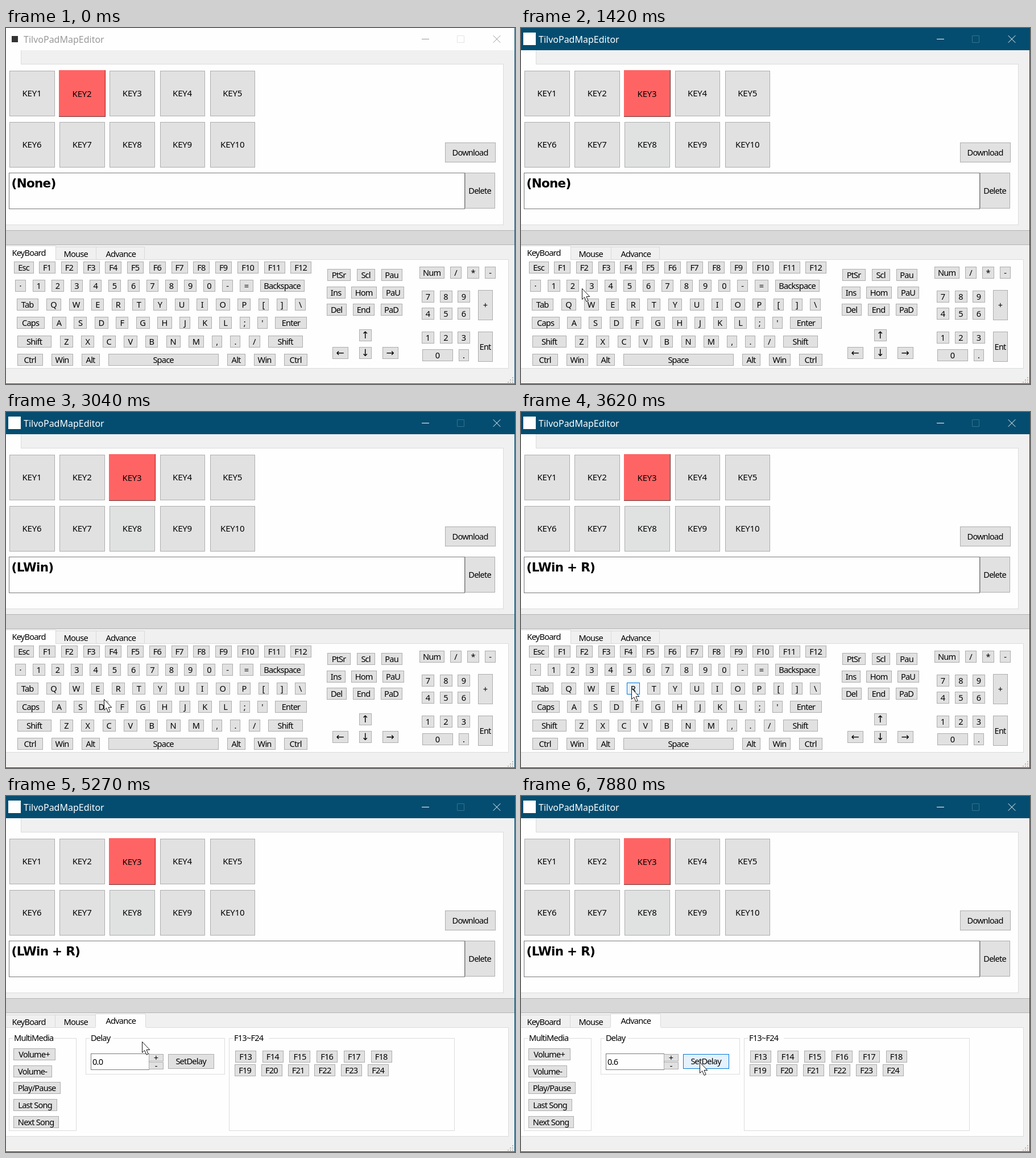
Recreate the animation shown at these times as an HTML page. Size 895 by 625 pixels, loop 7.99 s.

```html
<!DOCTYPE html>
<html lang="en">
<head>
<meta charset="utf-8">
<title>Key setter</title>
<style>
html, body { margin: 0; width: 100%; height: 100%; overflow: hidden; background: #f0f0f0; }
svg { display: block; width: 895px; height: 625px; }
text { font: 14.6px "Noto Sans", "Open Sans", sans-serif; letter-spacing: -.8px; fill: #000; white-space: pre; }
.big { font-size: 15px; letter-spacing: -.2px; }
.title { font-size: 16px; letter-spacing: 0; }
.macro { font: bold 21.5px "DejaVu Sans", sans-serif; letter-spacing: -.7px; }
.arrow { font: 17px "DejaVu Sans", sans-serif; letter-spacing: 0; }
.mid { text-anchor: middle; }
.btn { fill: #e1e1e1; stroke: #adadad; }
.btn.tint { fill: #e0e2e2; }
.btn.hover { fill: #e5f1fb; stroke: #0078d7; }
.btn.down { fill: #cce4f7; stroke: #005499; }
.tab { fill: #f0f0f0; stroke: #d9d9d9; }
.tab.hover, .tab.down { fill: #d8eaf9; }
.pane { fill: #fefefe; stroke: #dcdcdc; }
.field { fill: #fefefe; stroke: #7a7a7a; }
</style>
</head>
<body>
<svg id="stage" viewBox="0 0 895 625"></svg>
<script>
const stage = document.getElementById('stage');
const buttons = [];

function el(tag, attrs, parent = stage, text) {
  const node = document.createElementNS('http://www.w3.org/2000/svg', tag);
  for (const k in attrs) node.setAttribute(k, attrs[k]);
  if (text !== undefined) node.textContent = text;
  return parent.appendChild(node);
}
const fillBox = (x, y, width, height, fill, parent) => el('rect', { x, y, width, height, fill }, parent);
const label = (x, y, text, cls = '', parent) => el('text', { x, y, class: cls }, parent, text);
const line = (d, stroke, parent) => el('path', { d, stroke, fill: 'none' }, parent);

// Outlined box with both sides snapped to whole pixels
function frame(x, y, w, h, cls, parent) {
  const left = Math.round(x), width = Math.round(x + w) - left - 1;
  return el('rect', { x: left + .5, y: y + .5, width, height: h - 1, class: cls }, parent);
}

function button(page, x, y, w, h, text, cls = '') {
  const b = { page, x, y, w, h, base: 'btn', rect: frame(x, y, w, h, 'btn', page) };
  if (/[←-↓]/.test(text)) cls = 'arrow';
  label(x + w / 2 - .4, y + h / 2 + 5, text, 'mid ' + cls, page);
  buttons.push(b);
  return b;
}

// "name:width" items laid out left to right
function row(page, y, x, gap, spec, h = 21) {
  for (const item of spec.split(' ')) {
    const cut = item.lastIndexOf(':'), w = +item.slice(cut + 1);
    button(page, x, y, w, h, item.slice(0, cut).replace('_', ' '));
    x += w + gap;
  }
}

function tabs(page, edges, chosen) {
  frame(-2, 406, 886, 192, 'pane', page);
  ['KeyBoard', 'Mouse', 'Advance'].forEach((name, i) => {
    const x = edges[i], w = edges[i + 1] - x + 1, on = i === chosen;
    if (on) {
      fillBox(x, 382, w, 26, '#fefefe', page);
      line(`M${x + .5} 406V382.5H${x + w - .5}V406`, '#d9d9d9', page);
    } else {
      buttons.push({ page, x, y: 384, w, h: 23, base: 'tab', rect: frame(x, 384, w, 23, 'tab', page) });
    }
    label([10.5, 101.5, 175.5][i], on ? 400 : 402, name, '', page);
  });
}

function group(page, x, w, h, name, gap) {
  frame(x, 425, w, h, 'pane', page);
  fillBox(x + 7, 424, gap, 3, '#fefefe', page);
  label(x + 9, 430, name, '', page);
}

// Window
const bar = fillBox(0, 0, 895, 39, '#fefefe');
const icon = el('rect', {});
const title = label(31, 26, 'TilvoPadMapEditor', 'title');
const minMark = line('M731 19.5H744', '#999');
const maxMark = line('M793.5 13.5H805.5V25.5H793.5Z', '#e4e4e4');
const closeMark = line('M856.7 13.2L869.3 25.8M869.3 13.2L856.7 25.8', '#999');

// Upper pane
frame(-2, 63, 877, 283, 'pane');
fillBox(0, 39, 26, 27, '#fefefe');
line('M26.5 39V63', '#dcdcdc');
const pads = [];
for (let i = 0; i < 10; i++)
  pads.push(button(stage, 6 + 88.2 * (i % 5), i < 5 ? 75 : 165, 79.6, 80, 'KEY' + (i + 1), 'big'));
const [pad2, pad3, pad8] = [pads[1], pads[2], pads[7]];
const redPad = el('g', {});
fillBox(0, 0, 82, 82, '#6b2e2e', redPad);
fillBox(0, 0, 81, 81, '#ff6464', redPad);
const redText = label(40.5, 47, '', 'mid big', redPad);
button(stage, 772, 201, 89, 35, 'Download');
frame(5, 254, 802, 64, 'field');
button(stage, 807, 254, 53, 63, 'Delete');
const macro = label(9.5, 280, '', 'macro');

fillBox(0, 355, 895, 26, '#d8d8d8');
line('M0 355.5H895M0 380.5H895', '#b4b4b4');

// Keyboard page
const keys = el('g', {});
tabs(keys, [-1, 87, 158, 243], 0);
button(keys, 14, 410, 35, 21, 'Esc');
for (let i = 1; i < 10; i++) button(keys, 58 + 38.75 * (i - 1), 410, 29, 21, 'F' + i);
row(keys, 410, 407, 9.5, 'F10:37 F11:37 F12:37');
button(keys, 16, 442, 19, 21, '·');
for (let i = 0; i < 10; i++) button(keys, 47 + 33.3 * i, 442, 21.5, 21, (i + 1) % 10);
row(keys, 442, 380, 12, '-:19 =:24 Backspace:78');
button(keys, 19, 475, 38, 21, 'Tab');
row(keys, 475, 71, 13.6, 'Q:26 W:26 E:22 R:23 T:23 Y:24 U:25 I:20 O:25 P:23 [:18 ]:19 \\:19');
button(keys, 19, 507, 49, 21, 'Caps');
row(keys, 507, 81, 13.4, "A:25 S:23 D:24 F:22 G:24 H:26 J:19 K:24 L:22 ;:18 ':18 Enter:56");
button(keys, 20, 540, 60, 21, 'Shift');
row(keys, 540, 95, 14.3, 'Z:23 X:23 C:23 V:24 B:22 N:25 M:27 ,:18 .:18 /:20 Shift:61');
row(keys, 572, 20, 15, 'Ctrl:45 Win:38 Alt:32 Space:194 Alt:32 Win:38 Ctrl:41');
row(keys, 423, 565, 11, 'PtSr:41 Scl:32 Pau:37');
row(keys, 454, 564, 10, 'Ins:33 Hom:45 PaU:38');
row(keys, 484, 564, 11, 'Del:35 End:38 PaD:38');
button(keys, 621, 529, 22, 21, '↑');
row(keys, 560, 574, 19, '←:28 ↓:22 →:28');
row(keys, 419, 727, 10, 'Num:44 /:20 *:21 -:19');
['789', '456', '123'].forEach((set, i) => row(keys, [461, 491, 533][i], 731, 9.5, [...set].map(c => c + ':22').join(' ')));
row(keys, 564, 732, 10, '0:54 .:18');
button(keys, 830, 460, 26, 53, '+');
button(keys, 830, 533, 26, 53, 'Ent');

// Advance page
const extra = el('g', {});
tabs(extra, [-1, 86, 157, 245], 2);
group(extra, 5, 119, 163, 'MultiMedia', 72);
group(extra, 140, 245, 64, 'Delay', 41);
group(extra, 392, 397, 163, 'F13~F24', 63);
['Volume+:74', 'Volume-:68', 'Play/Pause:83', 'Last_Song:77', 'Next_Song:80']
  .forEach((spec, i) => row(extra, Math.round(443 + 29.7 * i), 13, 0, spec));
frame(149, 452, 103, 29, 'field', extra);
const delay = label(152, 472, '', '', extra);
button(extra, 251, 453, 26, 13, '+');
button(extra, 251, 467, 26, 13, '-');
button(extra, 285, 453, 81, 26, 'SetDelay');
for (let i = 0; i < 6; i++) {
  button(extra, 403 + 47.7 * i, 447, 37, 21, 'F' + (13 + i));
  button(extra, 402 + 46.8 * i, 471, 37, 21, 'F' + (19 + i));
}

for (let i = 0; i < 3; i++)
  for (let j = 0; j <= i; j++) fillBox(890 - 4 * j, 613 + 4 * i, 2, 2, '#b8b8b8');
const edge = line('M894.5 0V624.5H0', '#2c5f7c');

const halo = el('circle', { r: 16, fill: '#fff200', 'fill-opacity': .55 });
const arrow = el('path', {
  d: 'M.5 .5V19.5L4.7 15.6L8 23.3L11.2 22L8 14.6H13.8Z',
  fill: '#fff', stroke: '#111', 'stroke-linejoin': 'round'
});

// Timing
const loop = 7990;
const starts = [0, 130, 960, 1770, 2570, 3410, 4210, 5040, 5840, 6670, 7270, 7880, loop];
const path = [
  [130, 418, 400], [480, 290, 215], [720, 205, 140], [830, 195, 128], [1075, 195, 128],
  [1190, 188, 215], [1420, 108, 456], [1650, 4, 572], [2340, 86, 579], [2570, 86, 579],
  [3170, 194, 485], [4210, 194, 485], [4590, 204, 398], [4920, 204, 398], [5500, 262, 453],
  [7150, 262, 453], [7730, 308, 459], [7880, 314, 467]
];
const spins = [5600, 5960, 6320, 6670, 6900, 7130];
const presses = [[820, 960], [2450, 2570], [3275, 3410], [4795, 4920], ...spins.map(s => [s, s + 180])];

function tick(t) {
  let i = starts.length - 2;
  while (starts[i] > t) i--;
  const n = i === 0 || i === 11 ? 1 : i > 8 ? 5 : 7;
  const step = (starts[i + 1] - starts[i]) / n;
  return starts[i] + step * Math.min(n - 1, Math.floor((t - starts[i] + 15) / step));
}

function pointer(t) {
  const i = path.findIndex(p => p[0] > t);
  if (i < 0) return path[path.length - 1].slice(1);
  if (i === 0) return path[0].slice(1);
  const a = path[i - 1], b = path[i], k = (t - a[0]) / (b[0] - a[0]);
  return [1, 2].map(c => Math.round(a[c] + (b[c] - a[c]) * k));
}

const show = (node, on) => node.setAttribute('display', on ? 'inline' : 'none');
const set = (node, attrs) => { for (const k in attrs) node.setAttribute(k, attrs[k]); };

function draw(now) {
  const t = tick(now % loop);
  const active = t >= 960, advanced = t >= 4920, seen = t >= 130;
  const [x, y] = pointer(t);
  const down = presses.some(([a, b]) => t >= a && t < b);
  const page = advanced ? extra : keys;

  set(bar, { fill: active ? '#044d70' : '#fefefe' });
  set(icon, active ? { x: 4, y: 8, width: 22, height: 22, fill: '#fefefe' }
                   : { x: 10, y: 14, width: 11, height: 11, fill: '#333' });
  title.style.fill = active ? '#fff' : '#999';
  for (const mark of [minMark, closeMark]) set(mark, { stroke: active ? '#fff' : '#999' });
  set(maxMark, { stroke: active ? '#36718d' : '#e4e4e4' });
  set(edge, { stroke: active ? '#044d70' : '#2c5f7c' });

  show(keys, !advanced);
  show(extra, advanced);
  const red = active ? pad3 : pad2;
  set(redPad, { transform: `translate(${Math.round(red.x) - 1} 74)` });
  redText.textContent = active ? 'KEY3' : 'KEY2';
  macro.textContent = t < 2570 ? '(None)' : t < 3410 ? '(LWin)' : '(LWin + R)';
  delay.textContent = '0.' + spins.filter(s => t >= s).length;

  for (const b of buttons) {
    const over = seen && (b.page === stage || b.page === page) &&
      x >= b.x && x < b.x + b.w && y >= b.y && y < b.y + b.h;
    const tint = b === pad8 && t >= 1300 ? ' tint' : '';
    b.rect.setAttribute('class', b.base + (over ? (down ? ' down' : ' hover') : tint));
  }

  show(arrow, seen);
  show(halo, down);
  set(arrow, { transform: `translate(${x} ${y})` });
  set(halo, { cx: x, cy: y - 1 });
}

const begin = performance.now();
function run() {
  draw(performance.now() - begin);
  requestAnimationFrame(run);
}
run();
</script>
</body>
</html>
```
